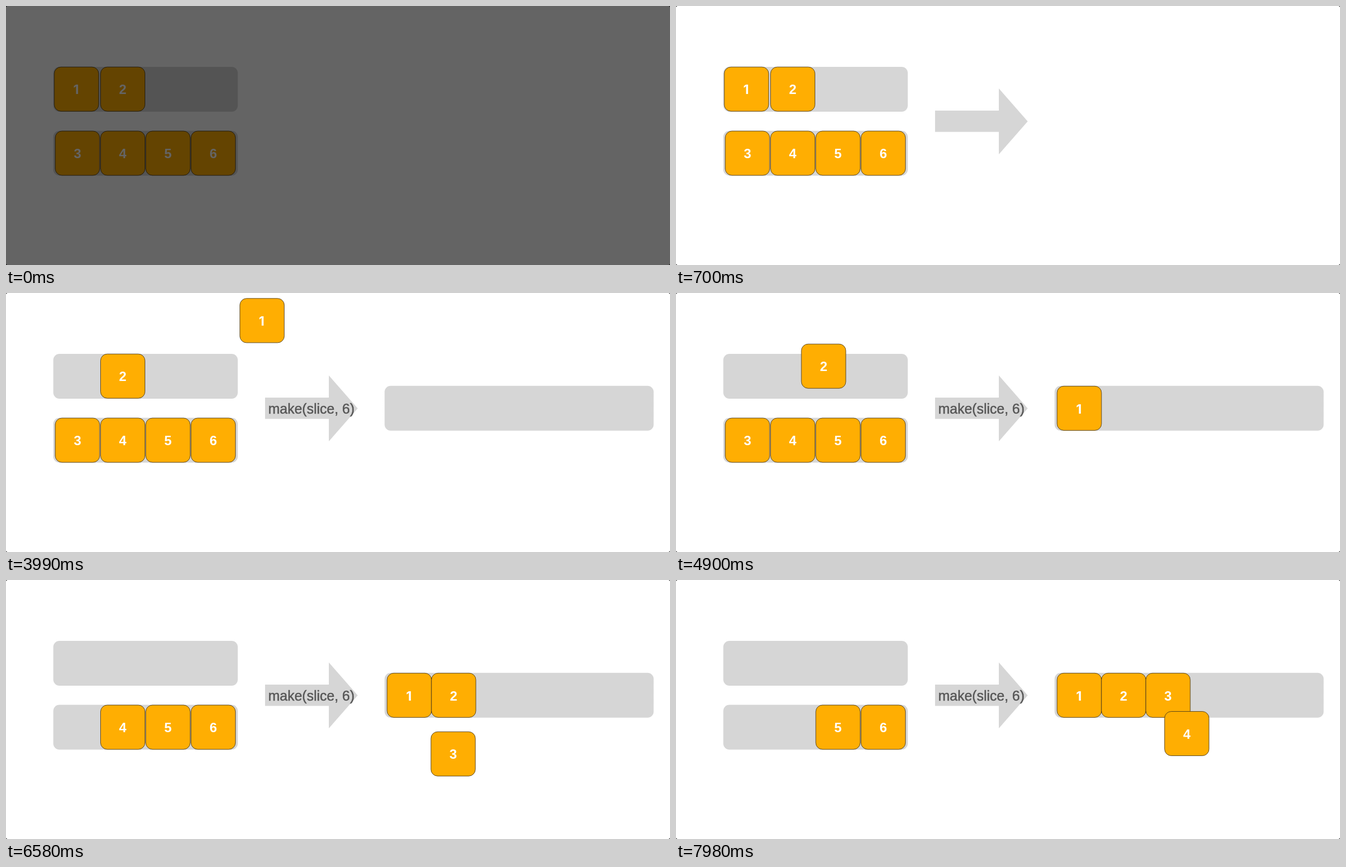
An HTML page with a canvas for the animation above (8000 ms loop, 1197 by 468 pixels).

```html
<!DOCTYPE html>
<html lang="en">
<head>
<meta charset="utf-8">
<title>Slice copy</title>
<style>
  html, body { margin: 0; width: 100%; height: 100%; overflow: hidden; background: #000; }
  canvas { display: block; }
</style>
</head>
<body>
<canvas id="stage" width="1197" height="468"></canvas>
<script>
const W = 1197, H = 468, LOOP = 8000, STEP = 70;
const GREY = [214, 214, 214], INK = [86, 86, 86], ORANGE = '#ffae02';
const ctx = document.getElementById('stage').getContext('2d');

const clamp = v => Math.max(0, Math.min(1, v));
const ease = u => u < 0.5 ? 2 * u * u : 1 - 2 * (1 - u) * (1 - u);

function bezier(p, t) {
  const s = 1 - t;
  return [0, 1].map(i => s * s * s * p[0][i] + 3 * s * s * t * p[1][i]
    + 3 * s * t * t * p[2][i] + t * t * t * p[3][i]);
}

// Returns a function giving the point at a fraction of the curve's length.
function makePath(points) {
  const n = 200, pts = [], len = [0];
  for (let i = 0; i <= n; i++) {
    pts.push(bezier(points, i / n));
    if (i) len.push(len[i - 1] + Math.hypot(pts[i][0] - pts[i - 1][0], pts[i][1] - pts[i - 1][1]));
  }
  return f => {
    const d = f * len[n];
    let i = 1;
    while (i < n && len[i] < d) i++;
    const k = (d - len[i - 1]) / (len[i] - len[i - 1]);
    return [0, 1].map(a => pts[i - 1][a] + (pts[i][a] - pts[i - 1][a]) * k);
  };
}

// Lower arc into a slot of the long bar.
const dip = (x0, x1) => [[x0, 266], [x1 - 520, 532], [x1 - 130, 458], [x1, 208.3]];

const tiles = [
  { at: [127, 150.2], start: 3447, path: [[127, 150.2], [327, 1], [527, 1], [727, 208.3]] },
  { at: [210.5, 150.2], start: 4672, path: [[210.5, 150.2], [410, 77], [607, 98], [807, 208.3]] },
  { at: [128.8, 266], start: 5818, path: dip(128.8, 887) },
  { at: [210.5, 266], start: 7130, span: 1085, path: dip(210.5, 967) },
  { at: [292, 266] },
  { at: [373.6, 266] }
];
for (const tile of tiles) if (tile.path) tile.move = makePath(tile.path);

function box(x, y, w, h, r, fill) {
  ctx.beginPath();
  ctx.roundRect(x, y, w, h, r);
  ctx.fillStyle = fill;
  ctx.fill();
}

const rgb = (c, a = 1) => `rgba(${c},${a})`;

// Left-to-right reveal with a soft edge ending at x.
function wipe(color, x, soft) {
  const g = ctx.createLinearGradient(x - soft, 0, x, 0);
  g.addColorStop(0, rgb(color));
  g.addColorStop(1, rgb(color, 0));
  return g;
}

function drawArrow() {
  ctx.beginPath();
  ctx.moveTo(467, 189);
  for (const [x, y] of [[582, 189], [582, 149], [634, 208.4], [582, 268], [582, 227.5], [467, 227.5]])
    ctx.lineTo(x, y);
  ctx.fillStyle = rgb(GREY);
  ctx.fill();
}

function drawLabel(t) {
  const color = wipe(INK, 475 + (t - 1510) * 0.227, 20);
  ctx.font = '25px "Liberation Sans", Arial, sans-serif';
  ctx.textAlign = 'center';
  ctx.fillStyle = ctx.strokeStyle = color;
  ctx.lineWidth = 0.5;
  ctx.fillText('make(slice, 6)', 550.5, 218);
  ctx.strokeText('make(slice, 6)', 550.5, 218);
}

function drawTile(tile, i, t) {
  const [x, y] = tile.move ? tile.move(ease(clamp((t - tile.start) / (tile.span || 1050)))) : tile.at;
  box(x - 40, y - 40, 80, 80, 12, ORANGE);
  ctx.strokeStyle = '#4a3a1c';
  ctx.lineWidth = 0.9;
  ctx.stroke();
  ctx.font = i ? 'bold 24px "Liberation Sans", Arial, sans-serif' : 'bold 23.5px Inter, sans-serif';
  ctx.textAlign = 'center';
  ctx.fillStyle = '#fff';
  ctx.fillText(i + 1, i ? x : x - 0.8, y + 9.2);
}

function draw(t) {
  ctx.fillStyle = '#000';
  ctx.fillRect(0, 0, W, H);
  box(0, 0, W, H, 3, '#fff');
  box(85.3, 110, 332.5, 81, 11, rgb(GREY));
  box(85.3, 225.5, 332.5, 81, 11, rgb(GREY));
  if (t >= 700) drawArrow();
  if (t > 1510) drawLabel(t);
  if (t > 2480) box(682.5, 167.7, 485, 81, 11, wipe(GREY, 683 + (t - 2480) * 0.59, 50));
  tiles.forEach((tile, i) => drawTile(tile, i, t));
  const dark = 0.608 * (1 - clamp(t / 280));
  if (dark) {
    ctx.fillStyle = `rgba(0,0,0,${dark})`;
    ctx.fillRect(0, 0, W, H);
  }
}

const begin = performance.now();
function tick() {
  const t = (performance.now() - begin) % LOOP;
  draw(Math.floor(t / STEP) * STEP);
  requestAnimationFrame(tick);
}
tick();
</script>
</body>
</html>
```
